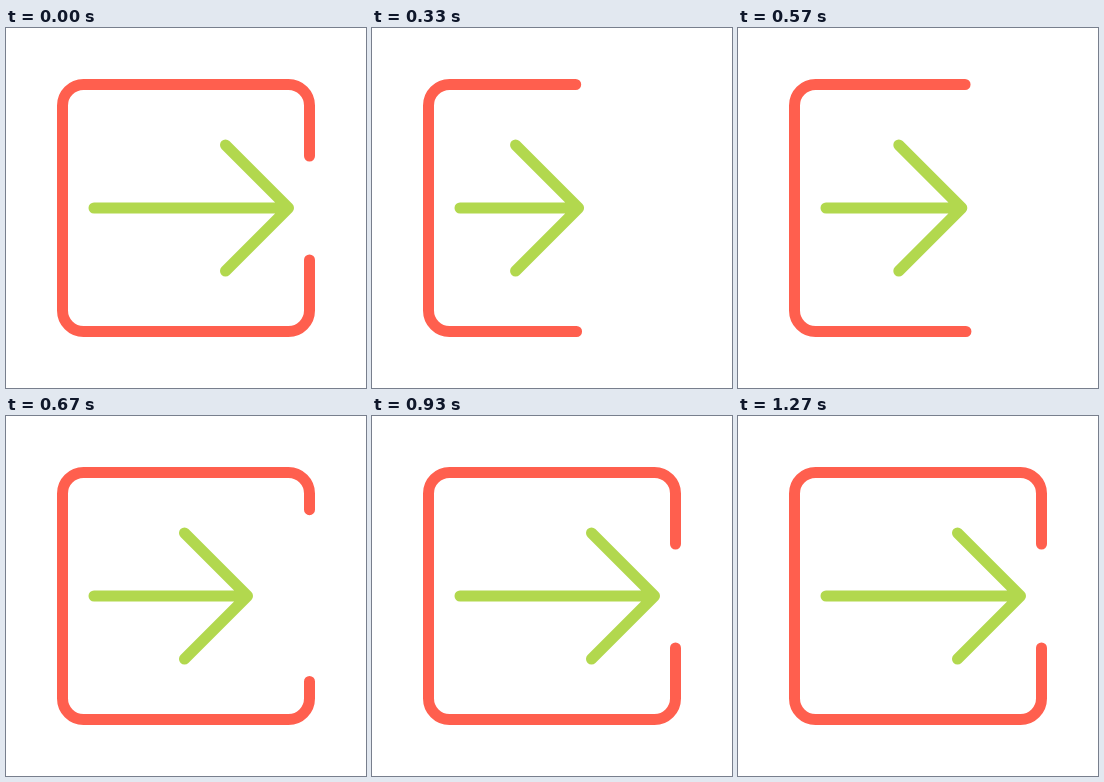
An HTML page that plays this animation: 360 by 360 pixels, repeating every 2000 ms.

```html
<!DOCTYPE html>
<html lang="en">
<head>
<meta charset="utf-8">
<title>Exit arrow</title>
<style>
  html, body { margin: 0; width: 100%; height: 100%; overflow: hidden; background: #fff; }
  svg { display: block; width: 100%; height: 100%; }
  path { fill: none; stroke-width: 11; stroke-linecap: round; stroke-linejoin: round; }
</style>
</head>
<body>
<svg viewBox="0 0 360 360">
  <path id="door" stroke="#ff5f4e" d="M303.5 128V77.5a21 21 0 0 0-21-21H77.5a21 21 0 0 0-21 21V282.5a21 21 0 0 0 21 21H282.5a21 21 0 0 0 21-21V232"/>
  <path id="arrow" stroke="#b2d84e"/>
</svg>
<script>
const LOOP = 2000, FPS = 30;
const door = document.getElementById('door');
const arrow = document.getElementById('arrow');
const doorLength = door.getTotalLength();

const smooth = x => x * x * (3 - 2 * x);
const gentle = x => 0.65 * x + 0.35 * smooth(x);

// Each key: [step, value, easing towards it]
const doorKeys = [[0, 0], [11.5, 170], [15, 173], [22, 0]];
const arrowKeys = [[0, 0], [12, -82], [28, 0, gentle], [32, -20], [38, 0]];

function valueAt(keys, step) {
  const next = keys.findIndex(key => key[0] > step);
  if (next < 0) return keys[keys.length - 1][1];
  const [start, from] = keys[next - 1];
  const [end, to, ease = smooth] = keys[next];
  return from + (to - from) * ease((step - start) / (end - start));
}

function draw(now) {
  const step = Math.floor((now % LOOP + 4) * FPS / 1000);
  const trim = valueAt(doorKeys, step);
  const tip = 282.5 + valueAt(arrowKeys, step);
  door.setAttribute('stroke-dasharray', `${doorLength - 2 * trim} ${doorLength}`);
  door.setAttribute('stroke-dashoffset', -trim);
  arrow.setAttribute('d', `M88 180H${tip}m-63-63l63 63l-63 63`);
}

const origin = performance.now();
function tick() {
  draw(performance.now() - origin);
  requestAnimationFrame(tick);
}
tick();
</script>
</body>
</html>
```
